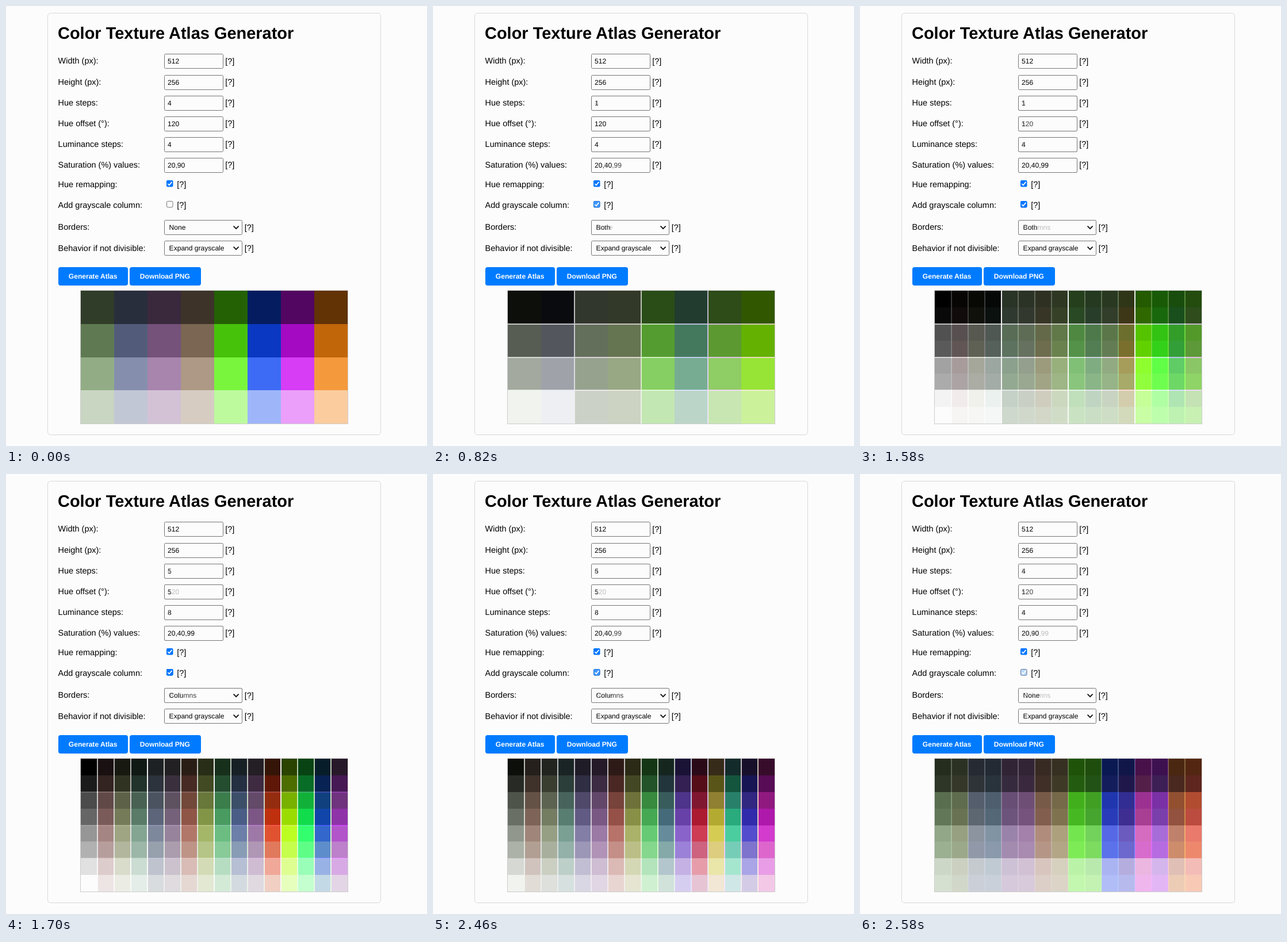
Write an HTML page that moves like this. It is 732 px wide and 765 px high and loops after 2640 ms.

```html
<!DOCTYPE html>
<html lang="en">
<head>
<meta charset="utf-8">
<title>Color Texture Atlas Generator</title>
<style>
  html, body { margin: 0; width: 100%; height: 100%; overflow: hidden; background: #fcfcfc; }
  svg { display: block; width: 732px; height: 765px; }
  text {
    font: 14.48px "Liberation Sans", Arial, sans-serif;
    text-rendering: geometricPrecision;
    white-space: pre;
  }
  .title { font-size: 28.96px; font-weight: bold; }
  .value { font-size: 12.07px; }
  .button { font-size: 12.07px; font-weight: bold; fill: #fff; }
  .box { fill: #fcfcfc; stroke: #767676; }
  .tick { fill: none; stroke: #fff; stroke-width: 1.7; }
  .arrow { fill: none; stroke: #111; stroke-width: 1.8; }
  .layer { opacity: 0; animation: 2640ms step-end infinite; }
  .second { animation-name: second; }
  .third { animation-name: third; }
  @keyframes second {
    0% { opacity: 0; }
    26.51% { opacity: .25; }
    28.78% { opacity: .5; }
    31.06% { opacity: .75; }
    33.33% { opacity: 1; }
    66.66%, 100% { opacity: 0; }
  }
  @keyframes third {
    0% { opacity: 0; }
    59.84% { opacity: .25; }
    62.12% { opacity: .5; }
    64.39% { opacity: .75; }
    66.66% { opacity: 1; }
    93.18% { opacity: .75; }
    95.45% { opacity: .5; }
    97.72% { opacity: .25; }
    100% { opacity: 0; }
  }
</style>
</head>
<body>
<svg id="stage" viewBox="0 0 732 765"></svg>
<script>
const ATLAS = { x: 130, y: 495, w: 464, h: 231 };
const PAPER = '#fcfcfc';

const text = (x, y, str, cls = '') => `<text x="${x}" y="${y}" class="${cls}">${str}</text>`;
const rect = (x, y, w, h, attrs) => `<rect x="${x}" y="${y}" width="${w}" height="${h}" ${attrs}/>`;
const hint = (x, y) => text(x, y, '[?]');

const fieldTop = row => Math.round(83.4 + 36.15 * row);
const fieldBase = row => 100.4 + 36.15 * row;

function field(row, value) {
  return rect(275.5, fieldTop(row) + .5, 102, 25, 'rx="2" class="box"') +
    text(281, fieldBase(row), value, 'value');
}

function checkbox(y, on) {
  if (!on) return rect(279.5, y + .5, 10.5, 10.5, 'rx="2" class="box"');
  return rect(279, y, 11.5, 11.5, 'rx="2" fill="#0075ff"') +
    `<path class="tick" d="M281.3 ${y + 6}l2.5 2.5 4.6 -5.6"/>`;
}

function select(y, value) {
  return rect(275.5, y + .5, 135, 25, 'rx="2" class="box"') +
    text(283.6, y + 17, value, 'value') +
    `<path class="arrow" d="M395.6 ${y + 10.7}l4.5 4.5 4.5 -4.5"/>`;
}

function button(x, w, label) {
  return rect(x, 454, w, 32, 'rx="4" fill="#007bff"') + text(x + 17.8, 473.7, label, 'button');
}

// One column per gray ramp and per saturation/hue pair, dark to light.
function atlas({ hues, sats, rows, gray, lines }) {
  const columns = sats.flatMap(s => hues.map(h => [h, s]));
  if (gray) columns.unshift(null);
  const left = i => ATLAS.x + Math.round(i * ATLAS.w / columns.length);
  const top = j => ATLAS.y + Math.round(j * ATLAS.h / rows);
  let out = '';
  columns.forEach((col, i) => {
    for (let j = 0; j < rows; j++) {
      const fill = col
        ? `hsl(${col[0]},${col[1]}%,${100 * (j + 1) / (rows + 1)}%)`
        : `hsl(0,0%,${99 * j / (rows - 1)}%)`;
      out += rect(left(i), top(j), left(i + 1) - left(i), top(j + 1) - top(j), `fill="${fill}"`);
    }
  });
  const line = `fill="${PAPER}" fill-opacity=".92"`;
  if (lines !== 'None') {
    for (let i = 1; i < columns.length; i++) out += rect(left(i) - 1, ATLAS.y, 2, ATLAS.h, line);
  }
  if (lines === 'Both') {
    for (let j = 1; j < rows; j++) out += rect(ATLAS.x, top(j) - 1, ATLAS.w, 2, line);
  }
  return `<g shape-rendering="crispEdges">${out}</g>`;
}

function settings(s) {
  return field(2, s.hues.length) + field(3, s.offset) + field(4, s.rows) + field(5, s.sats.join(',')) +
    checkbox(339, s.gray) + select(372, s.lines) + atlas(s);
}

function page() {
  const labels = ['Width (px):', 'Height (px):', 'Hue steps:', 'Hue offset (°):',
    'Luminance steps:', 'Saturation (%) values:'];
  let out = rect(72.5, 12.5, 579, 733, `rx="5" fill="${PAPER}" stroke="#d8d8d8"`) +
    text(90, 57.2, 'Color Texture Atlas Generator', 'title');
  labels.forEach((label, i) => {
    out += text(90.6, fieldBase(i), label) + hint(381.2, fieldBase(i) + .3);
  });
  out += field(0, 512) + field(1, 256);
  [['Hue remapping:', 315, 297.3], ['Add grayscale column:', 351, 297.3],
    ['Borders:', 389.4, 414.8], ['Behavior if not divisible:', 425.6, 414.8]]
    .forEach(([label, y, x]) => { out += text(90.6, y, label) + hint(x, y + .3); });
  return out + checkbox(303, true) + select(408, 'Expand grayscale') +
    button(91, 121, 'Generate Atlas') + button(215, 124, 'Download PNG') +
    rect(ATLAS.x - .5, ATLAS.y - .5, ATLAS.w + 1, ATLAS.h + 1, 'fill="none" stroke="#ccc"');
}

const first = { hues: [100, 225, 290, 30], offset: 120, rows: 4, sats: [20, 90], gray: false, lines: 'None' };
const second = { hues: [100], offset: 120, rows: 4, sats: [20, 40, 99], gray: true, lines: 'Both' };
const third = { hues: [4, 71, 147, 234, 285], offset: 5, rows: 8, sats: [20, 40, 99], gray: true, lines: 'Columns' };

document.getElementById('stage').innerHTML = page() + settings(first) +
  `<g class="layer second">${settings(second)}</g>` +
  `<g class="layer third">${settings(third)}</g>`;
</script>
</body>
</html>
```
